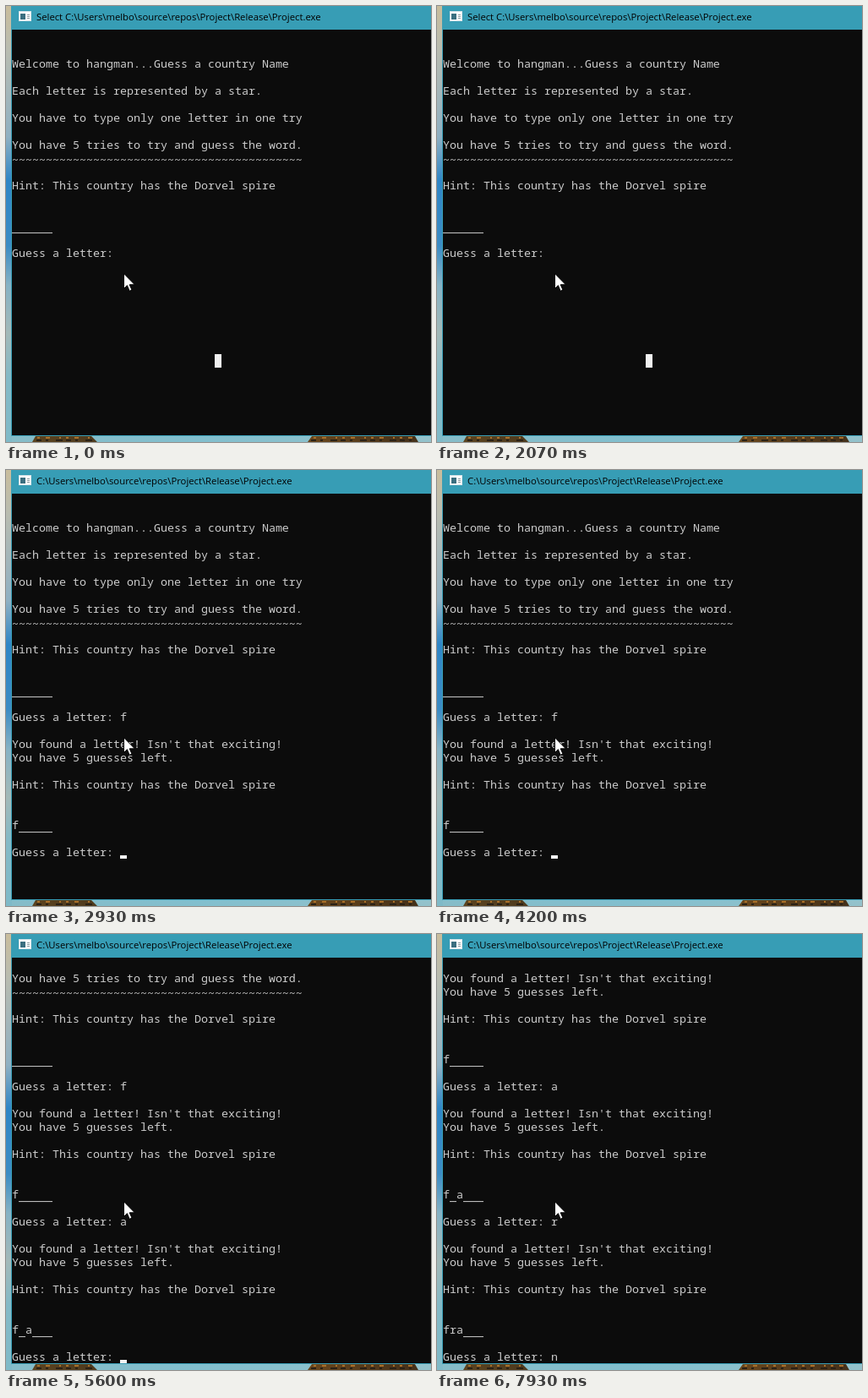
Recreate the animation shown at these times as an HTML page. Size 503 px wide and 516 px high, loop 8000 ms.

```html
<!DOCTYPE html>
<html lang="en">
<head>
<meta charset="utf-8">
<title>Hangman console</title>
<style>
  html, body { margin: 0; width: 100%; height: 100%; overflow: hidden; background: #0c0c0c; }
  svg { display: block; width: 503px; height: 516px; }
  text { white-space: pre; font-variant-ligatures: none; }
  #rows { font: 13.333px "Noto Sans Mono", "DejaVu Sans Mono", monospace; fill: #ccc; }
  #title { font: 11.3px "Open Sans", "Noto Sans", sans-serif; fill: #000; }
</style>
</head>
<body>
<svg viewBox="0 0 503 516">
  <defs>
    <linearGradient id="side" x2="0" y2="1">
      <stop offset="0" stop-color="#c9bd9c"/>
      <stop offset=".1" stop-color="#b9bcb0"/>
      <stop offset=".3" stop-color="#8fb0c2"/>
      <stop offset=".4" stop-color="#2f86c6"/>
      <stop offset=".55" stop-color="#3c8cc4"/>
      <stop offset=".64" stop-color="#86b2c4"/>
      <stop offset=".75" stop-color="#a3b9b8"/>
      <stop offset=".85" stop-color="#84b9c6"/>
      <stop offset="1" stop-color="#7fbac8"/>
    </linearGradient>
    <linearGradient id="base">
      <stop offset="0" stop-color="#86bcc8"/>
      <stop offset=".45" stop-color="#82bfce"/>
      <stop offset="1" stop-color="#94c2cb"/>
    </linearGradient>
    <linearGradient id="rock">
      <stop offset="0" stop-color="#5b431f"/>
      <stop offset=".4" stop-color="#3d2f1b"/>
      <stop offset=".7" stop-color="#6b481d"/>
      <stop offset="1" stop-color="#443019"/>
    </linearGradient>
  </defs>

  <rect y="508" width="503" height="8" fill="url(#base)"/>
  <rect width="7" height="516" fill="url(#side)"/>
  <path d="M31 516L35 509H101L108 516ZM357 516L362 509H484L488 516Z" fill="url(#rock)"/>
  <g fill="none" stroke-width="2">
    <path d="M37 511H100M364 511H482" stroke="#a8702a" stroke-dasharray="3 7 5 11 2 6"/>
    <path d="M36 514H103M361 514H484" stroke="#2a2116" stroke-dasharray="6 5 3 9 8 4"/>
  </g>

  <rect x="6" width="497" height="509" fill="#379db5"/>
  <rect x="7" y="28" width="496" height="480" fill="#0c0c0c"/>
  <g>
    <rect x="15.5" y="6.5" width="14" height="11" fill="#fff" stroke="#d9e6ea"/>
    <rect x="17" y="9" width="6" height="7" fill="#3b6f80"/>
    <path d="M25 10.5h3M25 12.5h3M25 14.5h3" stroke="#8a9aa0"/>
  </g>
  <text id="title" x="36" y="17"></text>

  <g id="rows"></g>
  <rect id="mark" x="247" y="412" width="8" height="16" fill="#f2f2f2"/>
  <rect id="caret" width="8" height="4" fill="#f2f2f2"/>
  <path d="M139.5 316.8V334.5L143.4 330.7L146.2 337.3L149 336.1L146.2 329.8H152.3Z" fill="#fff" stroke="#000"/>
</svg>
<script>
const LOOP = 8000, LEFT = 7, TOP = 28, COL = 8, ROW = 16, VISIBLE = 30;
const BASELINE = 13, RULE_DROP = 1.5;
const PATH = "C:\\Users\\melbo\\source\\repos\\Project\\Release\\Project.exe";
const WORDS = ["______", "f_____", "f_a___", "fra___"];
const GUESSES = "far";

// time, rounds answered, typed text, caret shown, selection active
const STEPS = [
  [0, 0, "", 0, 1], [470, 0, "", 1, 1], [1000, 0, "", 0, 1],
  [1530, 0, "", 1, 1], [2070, 0, "", 0, 1],
  [2130, 0, "f", 1], [2600, 0, "f", 0],
  [2930, 1, "", 1], [3670, 1, "", 0], [4200, 1, "", 1], [4730, 1, "", 0],
  [4930, 1, "a", 1], [5270, 1, "a", 0], [5530, 1, "a\n", 1],
  [5600, 2, "", 1], [6270, 2, "r", 1], [6330, 2, "r", 0], [6870, 2, "r", 1],
  [6930, 3, "", 1], [7730, 3, "n", 1], [7930, 3, "n", 0]
];

const INTRO = [
  "", "", "Welcome to hangman...Guess a country Name",
  "", "Each letter is represented by a star.",
  "", "You have to type only one letter in one try",
  "", "You have 5 tries to try and guess the word.",
  "~".repeat(43), "", ""
].join("\n");
const FOUND = "\n\nYou found a letter! Isn't that exciting!\nYou have 5 guesses left.\n\n";
const ask = word =>
  `Hint: This country has the Dorvel spire\n\n\n${word}\n\nGuess a letter: `;

function transcript(rounds, typed) {
  let out = INTRO + ask(WORDS[0]);
  for (let i = 0; i < rounds; i++) out += GUESSES[i] + FOUND + ask(WORDS[i + 1]);
  return (out + typed).split("\n");
}

const el = id => document.getElementById(id);
const svg = (name, parent, attrs) => {
  const node = document.createElementNS("http://www.w3.org/2000/svg", name);
  for (const key in attrs) node.setAttribute(key, attrs[key]);
  return parent.appendChild(node);
};
const show = (node, on) => node.setAttribute("visibility", on ? "visible" : "hidden");

const rows = Array.from({ length: VISIBLE }, () => svg("text", el("rows"), { x: LEFT }));

// Underscores and tildes sit a little lower than the letters.
function setRow(row, i, line) {
  row.textContent = "";
  for (const part of line.split(/([_~]+)/).filter(Boolean)) {
    const drop = /[_~]/.test(part) ? RULE_DROP : 0;
    svg("tspan", row, { y: TOP + i * ROW + BASELINE + drop }).textContent = part;
  }
}

function draw([, rounds, typed, caretOn, selecting]) {
  const lines = transcript(rounds, typed).slice(-VISIBLE);
  rows.forEach((row, i) => setRow(row, i, lines[i] || ""));
  el("title").textContent = (selecting ? "Select " : "") + PATH;
  show(el("mark"), selecting);
  show(el("caret"), caretOn);
  el("caret").setAttribute("x", LEFT + lines[lines.length - 1].length * COL);
  el("caret").setAttribute("y", TOP + lines.length * ROW - 4);
}

let current;
function tick() {
  const t = performance.now() % LOOP;
  const step = STEPS.findLast(s => s[0] <= t);
  if (step !== current) draw(current = step);
  requestAnimationFrame(tick);
}
tick();
</script>
</body>
</html>
```
